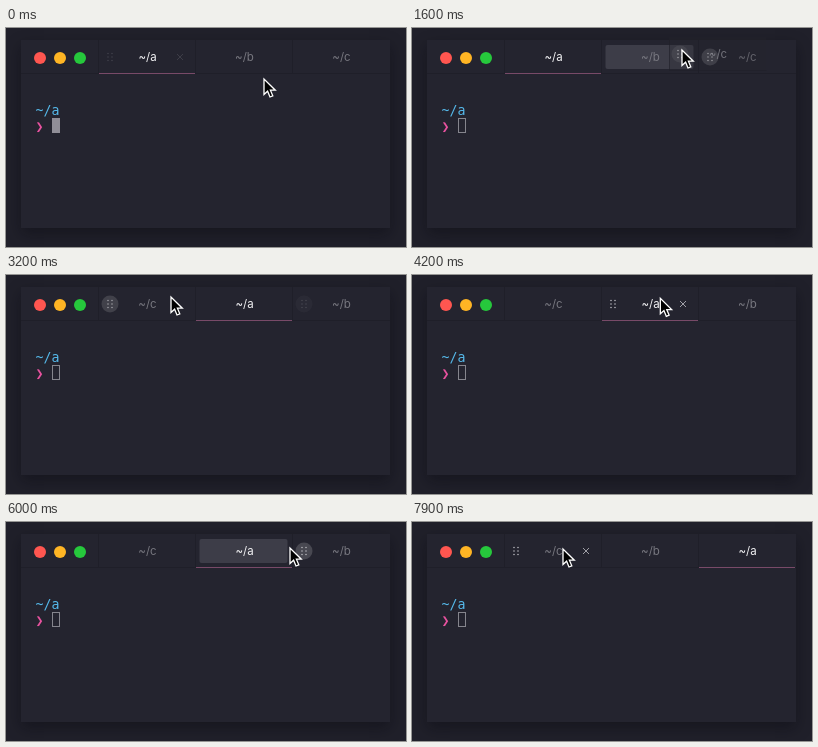
Animation of 400 by 219 pixels, one loop 8000 ms. Source, as an HTML page:

```html
<!DOCTYPE html>
<html lang="en">
<head>
<meta charset="utf-8">
<title>Terminal tabs</title>
<style>
  html, body { margin: 0; width: 100%; height: 100%; overflow: hidden; background: #20202a; }
  svg { position: absolute; left: 0; top: 0; width: 400px; height: 219px; }
  .window { position: absolute; left: 15px; top: 12px; width: 369px; height: 188px;
            background: #24242f; box-shadow: 0 6px 14px rgba(8, 8, 14, .4); }
  .tab { font: 11.5px Inter, Roboto, sans-serif; text-anchor: middle; }
  .mono { font: 13.3px "DejaVu Sans Mono", monospace; }
</style>
</head>
<body>
<div class="window"></div>
<svg viewBox="0 0 400 219">
  <circle cx="34" cy="30" r="6" fill="#ff5650"/>
  <circle cx="54" cy="30" r="6" fill="#ffb524"/>
  <circle cx="74" cy="30" r="6" fill="#26c83c"/>
  <path d="M92.5 12V46M189.5 12V46M286.5 12V46M15 45.5H384" stroke="#1f1f29" fill="none"/>
  <text class="mono" x="29.5" y="86.5" fill="#55b8e9">~/a</text>
  <text class="mono" x="29.5" y="102.5" fill="#e8529f">❯</text>
  <g id="scene"></g>
</svg>
<script>
const LOOP = 8000, STEP = 100, TAB = 97, LEFT = 93;
const scene = document.getElementById('scene');

// Pointer path: time, x, y
const path = [
  [-200, 160, 30], [-100, 160, 30], [0, 258, 51], [500, 310, 27], [800, 300, 25],
  [1000, 300, 25], [1100, 299, 25], [1500, 299, 25], [1600, 270, 22], [2000, 180, 20],
  [2300, 165, 22], [3800, 165, 22], [4400, 290, 24], [4700, 310, 27], [5000, 303, 26],
  [5200, 299, 26], [5800, 299, 26], [5900, 295, 26], [6200, 262, 26], [6600, 222, 28],
  [7100, 222, 28], [7900, 151, 27]
];

function pointer(t) {
  const i = path.findIndex(p => p[0] >= t);
  if (i < 1) return path[i ? path.length - 1 : 0].slice(1);
  const [a, b] = [path[i - 1], path[i]], k = (t - a[0]) / (b[0] - a[0]);
  return [a[1] + (b[1] - a[1]) * k, a[2] + (b[2] - a[2]) * k];
}

const order = t => t < 3200 ? 'abc' : t < 7200 ? 'cab' : 'cba';
const dragging = t => (t >= 1500 && t < 3200) || (t >= 5900 && t < 7200);
const tabLeft = slot => LEFT + slot * TAB;

function slotAt([x, y]) {
  return y > 45 || x < LEFT ? -1 : Math.floor((x - LEFT) / TAB);
}

// Visibility of a tab's grip dots, grip circle and close button
function controls(slot, t) {
  if (dragging(t)) return slot === 2 ? [1, 1, 0] : [0, 0, 0];
  const p = pointer(t);
  if (slotAt(p) !== slot) return [0, 0, 0];
  const held = t >= 3200 && t < 3900;
  const onGrip = held || Math.hypot(p[0] - tabLeft(slot) - 11, p[1] - 29) < 10;
  return onGrip ? [1, 1, 0] : [1, 0, 1];
}

function faded(slot, t) {
  const before = controls(slot, t - STEP);
  return controls(slot, t).map((v, i) => v * .8 + before[i] * .2);
}

const label = (x, y, name, color) =>
  `<text class="tab" x="${x}" y="${y + 4}" fill="${color}">~/${name}</text>`;

function grip(x, y, dots, circle) {
  let out = `<circle cx="${x}" cy="${y}" r="8.5" fill="#484851" opacity="${circle}"/>`;
  for (let i = 0; i < 6; i++)
    out += `<circle cx="${x - 2 + i % 2 * 4}" cy="${y - 3.5 + (i >> 1) * 3.5}" r=".8" fill="#b4b4ba" opacity="${dots}"/>`;
  return out;
}

function tab(slot, name, t, target) {
  const x = tabLeft(slot), active = name === 'a';
  const [dots, circle, close] = faded(slot, t);
  let out = '';
  if (slot === target)
    out += `<rect x="${x + 3.5}" y="17" width="88" height="24" rx="2" fill="#3d3d48"/>`;
  if (active)
    out += `<path d="M${x} 45.5h96" stroke="#784a68"/>`;
  return out + grip(x + 11, 29, dots, circle) +
    label(x + 48.5, 29, name, active ? '#f2f2f4' : '#77777f') +
    `<path d="M${x + 78} 26l6 6m0 -6l-6 6" stroke="#a0a0a7" opacity="${close}"/>`;
}

function ghost(x, y, name) {
  return `<rect x="${x - 49}" y="${y - 17}" width="97" height="34" fill="#24242f" opacity=".25"/>
    <path d="M${x - 48.5} ${Math.max(12, y - 17)}V${y + 16.5}h97" fill="none" stroke="#1f1f29" opacity=".55"/>
    <g opacity=".8">${grip(x - 38, y, 1, 1)}${label(x, y, name, '#84848c')}</g>`;
}

function draw(t) {
  const [x, y] = pointer(t), names = order(t), drag = dragging(t);
  const over = drag ? slotAt([x, y]) : -1;
  const target = over === 2 ? -1 : over;
  let out = [...names].map((name, slot) => tab(slot, name, t, target)).join('');
  if (drag && x < 275) out += ghost(x + 36, y + 4, names[2]);
  out += t < 1500
    ? '<rect x="46" y="90" width="8" height="15" fill="#908e97"/>'
    : '<rect x="46.5" y="90.5" width="7" height="14" fill="none" stroke="#85858d"/>';
  out += `<path transform="translate(${x} ${y})" d="M0 0V15.5L3.6 12.2L6 18L8.8 16.8L6.4 11.2H11.3Z"
    fill="#000" stroke="#fff" stroke-width="1.3"/>`;
  scene.innerHTML = out;
}

const start = performance.now();
let last = -1;
function frame() {
  const t = Math.floor((performance.now() - start) % LOOP / STEP) * STEP;
  if (t !== last) draw(last = t);
  requestAnimationFrame(frame);
}
frame();
</script>
</body>
</html>
```
